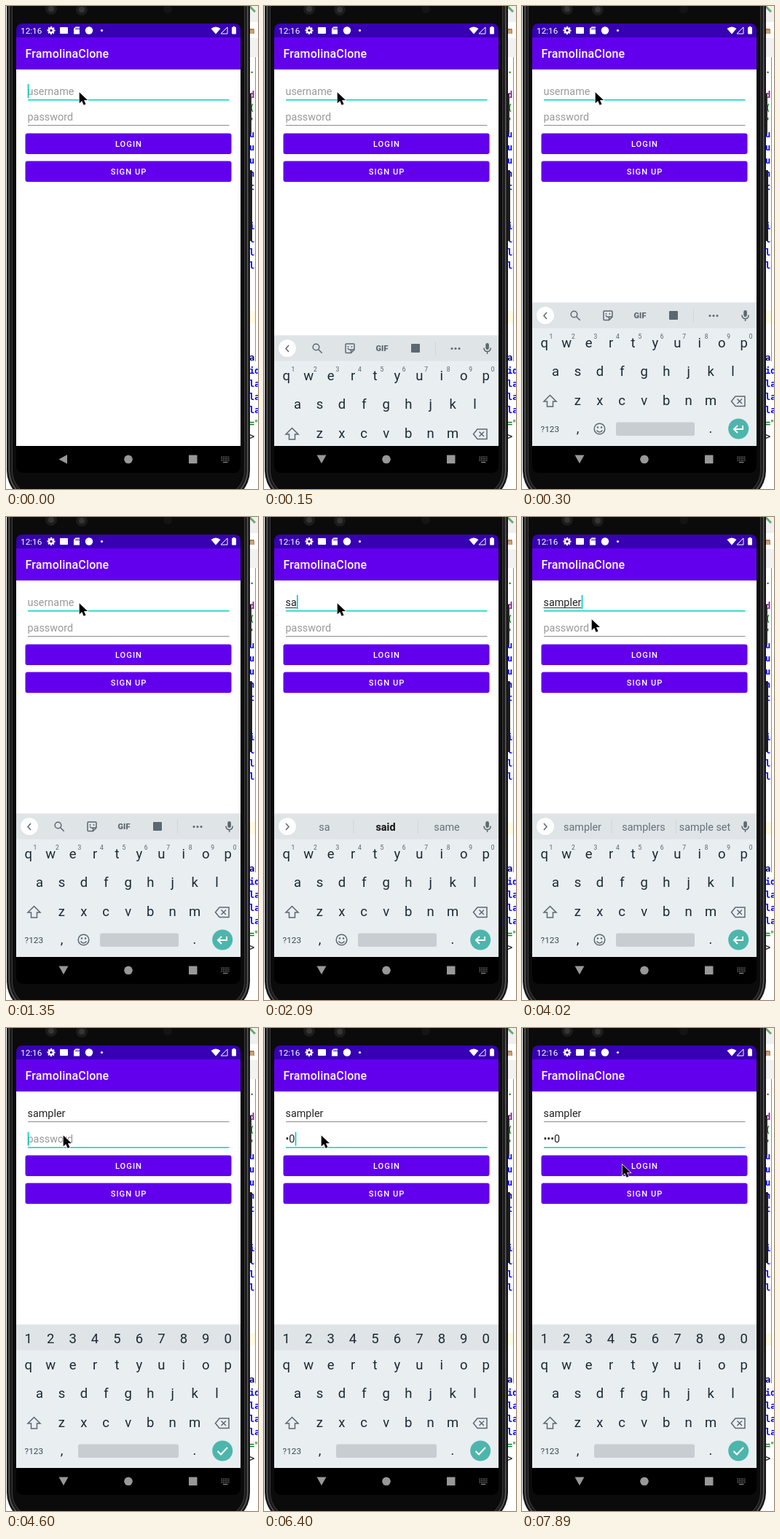
These frames come from a looping animation (346x662 px, 8000 ms). An HTML page:

```html
<!DOCTYPE html>
<html lang="en">
<head>
<meta charset="utf-8">
<title>Login screen</title>
<style>
html, body { margin: 0; width: 100%; height: 100%; overflow: hidden; background: #fff; }
svg { display: block; font-family: Roboto, sans-serif; }
text { white-space: pre; }
.mid { text-anchor: middle; }
.key { font-size: 18.5px; fill: #1b2b34; text-anchor: middle; }
.code { font: bold 12px "DejaVu Sans Mono", monospace; }
.line { fill: none; stroke: #5c6870; stroke-width: 1.5; }
</style>
</head>
<body>
<svg id="stage" width="346" height="662" viewBox="0 0 346 662"></svg>
<script>
const LOOP = 8000, TEAL = '#03d3c2', PURPLE = '#6200ee';
const stage = document.getElementById('stage');

const rect = (x, y, w, h, fill, rx = 0) =>
  `<rect x="${x}" y="${y}" width="${w}" height="${h}" fill="${fill}" rx="${rx}"/>`;
const circle = (x, y, r, fill) => `<circle cx="${x}" cy="${y}" r="${r}" fill="${fill}"/>`;
const path = (d, attrs = 'class="line"') => `<path d="${d}" ${attrs}/>`;
const text = (s, x, y, attrs = '') => `<text x="${x}" y="${y}" ${attrs}>${s}</text>`;

// Code editor behind the phone: baseline, text, colour
const code = [
  [38, 'm', '#a05a1c'], [92, '.', '#067d17'], [126, 'd', '#871094'], [144, '(', '#067d17'],
  [162, "'", '#067d17'], [180, 'u', '#00f'], [198, 'ur', '#00f'], [216, 'u', '#00f'],
  [234, 'n', '#00f'], [252, 't:', '#00f'], [306, 'id', '#00f'], [324, 'la', '#00f'],
  [342, 'la', '#00f'], [360, 'la', '#00f'], [486, 'a.', '#000080'], [504, 'id', '#00f'],
  [522, 'la', '#00f'], [540, 'la', '#00f'], [558, 'la', '#00f'], [576, '="', '#067d17'],
  [594, '&gt;', '#222']
];

function editor() {
  return rect(0, 0, 346, 662, '#fff') + rect(330, 0, 16, 22, '#f0f0f0') +
    path('M334 0L342 8', 'stroke="#69a96b" stroke-width="3"') +
    rect(330, 44, 16, 26, '#f2f2f2') + rect(330, 418, 13, 17, '#fffae0') +
    code.map(([y, s, c]) => text(s, 334, y, `class="code" fill="${c}"`)).join('') +
    rect(343, 70, 3, 417, '#fff') + rect(342, 70, 1, 417, '#8c8c8c');
}

function phone() {
  const shells = [[1, '#161616'], [3.5, '#5c5c5c'], [5, '#1c1c1c'], [8, '#3a3a3a'], [9, '#0b0b0b']];
  return rect(333, 120, 4, 56, '#2c2c2c', 1) + rect(333, 225, 5, 97, '#1d1d1d', 1) +
    shells.map(([d, c]) => rect(d, -60, 336 - 2 * d, 740 - d, c, 43 - d)).join('') +
    [[62, 4], [104, 5]].map(([x, y]) =>
      circle(x, y, 8, '#1c1c1c') + circle(x, y, 4, '#353538')).join('') +
    circle(222, 4, 6, '#141414') + rect(14, 24, 308, 616, '#000', 9);
}

function statusBar() {
  const teeth = [...Array(8).keys()].map(i =>
    `<rect x="61" y="28" width="2.2" height="3" fill="#fff" transform="rotate(${i * 45} 62 33.5)"/>`).join('');
  return path('M14 43V33q0-9 9-9h290q9 0 9 9v10Z', 'fill="#3700b3"') +
    text('12:16', 20, 38, 'font-size="11.8" fill="#fff"') +
    teeth + `<circle cx="62" cy="33.5" r="2.9" fill="none" stroke="#fff" stroke-width="2.2"/>` +
    rect(74, 29, 11, 9, '#fff', 1) +
    path('M95.500 28.500H101V38.500H93V31Z', 'fill="#fff"') +
    path('M96 30v2.500M98 30v2.500M100 30v2.500', 'stroke="#3700b3"') +
    circle(114, 33.5, 5.2, '#fff') + circle(131.5, 33.5, 1.6, '#fff') +
    path('M281.500 31Q288 26 294.500 31L288 38.500Z', 'fill="#fff"') +
    path('M304 29V38H295Z', 'fill="none" stroke="#fff"') +
    rect(310, 29, 6, 9.5, '#fff', 1) + rect(311.5, 28, 3, 2, '#fff');
}

function button(label, y) {
  return rect(26.5, y, 283, 28.5, PURPLE, 3) +
    text(label, 168.5, y + 18.5, 'class="mid" font-size="11.2" font-weight="500" letter-spacing="1" fill="#fff"');
}

function app() {
  return rect(14, 43, 308, 44, PURPLE) + rect(14, 87, 308, 516, '#fff') +
    text('FramolinaClone', 26.5, 71, 'font-size="16" font-weight="500" letter-spacing=".15" fill="#fff"') +
    button('LOGIN', 174.5) + button('SIGN UP', 212.4);
}

function navBar() {
  const dots = [...Array(15).keys()].map(i =>
    rect(295.5 + i % 5 * 2.4, 617.5 + Math.floor(i / 5) * 2.4, 1.3, 1.3, '#888')).join('');
  return circle(168, 621.3, 5.8, '#989898') + rect(251, 615.5, 11.5, 11.5, '#989898', .5) +
    dots + rect(298, 624.8, 6.5, 1.2, '#888');
}

const mic = rect(304.3, 417, 4.6, 9, '#5c6870', 2.3) +
  path('M302 423.500q0 5 4.600 5t4.600-5M306.600 428.500v3.500', 'class="line" stroke-width="1.3"');

function strip({ tools, words, bold }) {
  if (tools === 'digits') return keyRow('1234567890', 30.7, 431.5);
  const arrow = words ? 'M30 420l4 4.500-4 4.500' : 'M34 420l-4 4.500 4 4.500';
  const chip = circle(32, 425, 12, '#d3d8db') + circle(32, 424.3, 12, '#fff') + path(arrow);
  const rule = x => rect(x, 415, 1, 19, '#cfd5d8');
  if (words) {
    return chip + mic + rule(122.5) + rule(211) + words.map((w, i) =>
      text(w, 83 + i * 84, 430, 'class="mid" font-size="14.4" ' +
        (i === 1 && bold ? 'font-weight="700" fill="#111"' : 'fill="#65717a"'))).join('');
  }
  return chip + mic + rule(235) +
    '<circle class="line" cx="71.500" cy="422.500" r="4.300"/>' + path('M74.700 425.700l5 5') +
    path('M113 418h10q1 0 1 1v7l-4.500 4.500h-6.500q-1 0-1-1v-10.500q0-1 1-1M119.500 430v-4h4.500M115 424q1.500 3 4 2') +
    circle(115.5, 422, .9, '#5c6870') + circle(120.5, 422, .9, '#5c6870') +
    text('GIF', 162, 428, 'class="mid" font-size="11" font-weight="900" fill="#5c6870"') +
    rect(202, 418, 12, 12, '#5c6870', 1) +
    [258, 263, 268].map(x => circle(x, 424.5, 1.5, '#5c6870')).join('');
}

function keyRow(keys, x, y) {
  return [...keys].map((k, i) => text(k, x + i * 30.45, y, 'class="key"')).join('');
}

function keyboard(s) {
  const secret = s.tools === 'digits', left = secret ? 99 : 129;
  const hints = secret ? '' : [...'1234567890'].map((d, i) =>
    text(d, 40 + i * 30.45, 456, 'class="mid" font-size="8.5" fill="#56636b"')).join('');
  const smile = '<circle class="line" cx="106.500" cy="579.500" r="7.300"/>' +
    circle(104, 577.5, 1.2, '#5c6870') + circle(109, 577.5, 1.2, '#5c6870') +
    path('M102.500 581.500q4 5 8 0');
  const action = secret ? 'M290.500 580l4.500 4.500 9-9.500' : 'M303 575v5h-11.500M296 575l-5 5 5 5';
  return `<g clip-path="url(#screen)"><g transform="translate(0 ${s.drop})">` +
    rect(14, 406.5, 308, 197, '#e9eef1') + rect(14, 406.5, 308, 35, '#dfe4e7') + strip(s) +
    keyRow('qwertyuiop', 30.7, 468) + hints +
    keyRow('asdfghjkl', 46, 507) + keyRow('zxcvbnm', 76.3, 547) +
    path('M38.500 533.500l8.500 8.500h-4.500v7h-8v-7h-4.500Z') +
    path('M293 535h13v13.500h-13l-5.500-6.700ZM295.500 538.500l6.500 6.500M302 538.500l-6.500 6.500') +
    text('?123', 38.3, 584, 'class="mid" font-size="11.8" fill="#3b4850"') +
    text(',', 76.5, 585, 'class="key"') + text('.', 259, 585, 'class="key"') +
    (secret ? '' : smile) + rect(left, 570.5, 237 - left, 18.5, '#c8cdd1', 2.5) +
    circle(297.2, 579.5, 14, '#4db6ac') +
    path(action, 'fill="none" stroke="#fff" stroke-width="2"') + '</g></g>';
}

// Each step changes part of the state: time, changes
const steps = [
  [0, { user: '', pass: '', focus: 'user', caret: 1, drop: null, tools: '', words: null, bold: 0, mouse: [100, 118] }],
  [150, { caret: 0, drop: 45 }],
  [300, { drop: 0 }],
  [900, { caret: 1 }],
  [1350, { caret: 0 }],
  [1650, { user: 's', caret: 1 }],
  [1800, { words: ['s', 'so', 'she'], bold: 1 }],
  [1940, { user: 'sa' }],
  [2090, { words: ['sa', 'said', 'same'] }],
  [2240, { user: 'sam', words: ['sam', 'same', 'sample'] }],
  [2690, { caret: 0 }],
  [3140, { user: 'samp', caret: 1, words: ['samp', 'sample', 'stamp'] }],
  [3280, { user: 'sampl', words: ['sampl', 'sample', 'samples'] }],
  [3580, { user: 'sample', words: ['sample', 'samples', 'sampled'] }],
  [3720, { user: 'sampler', words: ['sampler', 'samplers', 'sample set'], bold: 0 }],
  [4020, { mouse: [95, 140] }],
  [4160, { mouse: [78, 147] }],
  [4310, { focus: 'pass' }],
  [4450, { tools: 'digits', words: null }],
  [5050, { caret: 0 }],
  [5650, { caret: 1 }],
  [5950, { pass: '0' }],
  [6400, { pass: '•0' }],
  [6850, { caret: 0 }],
  [7000, { pass: '••0', caret: 1 }],
  [7300, { pass: '•••0' }],
  [7890, { caret: 0, mouse: [137, 187] }]
];

function field(id, hint, y, s) {
  const value = s[id], active = s.focus === id;
  return text(value || hint, 29.5, y, `id="${id}" font-size="14.4" fill="${value ? '#222' : '#999'}"`) +
    rect(30, y + 6, 276.5, active ? 1.5 : 1, active ? TEAL : '#8c8c8c');
}

function pointer([x, y]) {
  return path(`M${x + .7} ${y + .3}v15l3.500-3.300 2.500 5.800 2.800-1.200-2.500-5.600h5Z`,
    'fill="#000" stroke="#fff" stroke-width="1.4" paint-order="stroke"');
}

stage.innerHTML = '<clipPath id="screen"><rect x="14" y="87" width="308" height="516"/></clipPath>' +
  editor() + phone() + statusBar() + app() + navBar() + '<g id="live"></g>';
const live = document.getElementById('live');

function render(s) {
  const open = s.drop !== null;
  live.innerHTML = field('user', 'username', 122, s) + field('pass', 'password', 157, s) +
    (open ? keyboard(s) : '') +
    path(open ? 'M72.500 615.500h13l-6.500 11.500Z' : 'M84 615v12.500l-11.500-6.200Z', 'fill="#989898"') +
    '<g id="marks"></g>' + pointer(s.mouse);
  const width = s[s.focus] ? document.getElementById(s.focus).getComputedTextLength() : 0;
  const top = s.focus === 'user' ? 107 : 142.5;
  document.getElementById('marks').innerHTML =
    (s.focus === 'user' && width ? rect(29.5, 124, width, 1, '#333') : '') +
    (s.caret ? rect(29.7 + width, top, 1.7, 19, TEAL) : '');
}

let shown = -1;
function tick() {
  const t = performance.now() % LOOP;
  const count = steps.filter(step => step[0] <= t).length;
  if (count !== shown) {
    shown = count;
    render(Object.assign({}, ...steps.slice(0, count).map(step => step[1])));
  }
  requestAnimationFrame(tick);
}
tick();
</script>
</body>
</html>
```
